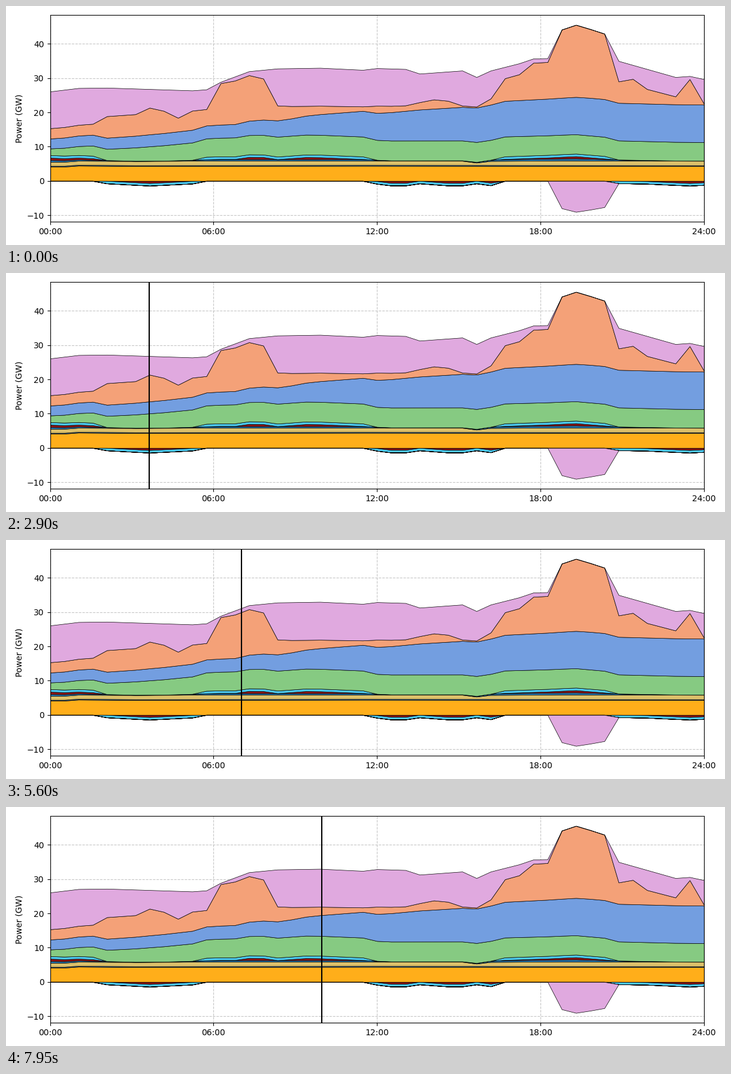
Animation of 1200 by 400 pixels, one loop 8 s. Source, as a matplotlib script:

```python
import numpy as np
import matplotlib.pyplot as plt
from matplotlib.animation import FuncAnimation

WIDTH, HEIGHT, DPI = 1200, 400, 100
FRAMES, INTERVAL = 160, 50
HOURS_PER_FRAME = 0.06278
STORE_LIMIT = 0.75

slots = np.arange(47)
hours = np.linspace(0, 24, slots.size)


def curve(points):
    """Piecewise linear curve through {slot: GW} points."""
    return np.interp(slots, list(points), list(points.values()))


# Layer thicknesses, bottom to top
amber = curve({1: 4.15, 2: 4.45, 6: 4.3, 22: 4.4, 46: 4.3})
steel = np.full(slots.size, 0.25)
khaki = curve({0: 1.15, 10: 1.3, 29: 1.25, 30: 0.7, 31: 1.2, 36: 1.35, 46: 1.3})
navy = curve({0: 0.5, 6: 0.05, 8: 0.05, 12: 0.45, 22: 0.4, 24: 0.05, 29: 0.1,
              32: 0.45, 37: 0.6, 40: 0.3, 44: 0.05})
green = curve({0: 1.95, 4: 3.3, 7: 4.2, 11: 5.35, 16: 5.8, 32: 5.8, 46: 5.4})
blue = curve({0: 2.9, 7: 3.5, 13: 3.9, 17: 5.05, 22: 7.5, 26: 9.05, 31: 10.3,
              38: 11, 46: 10.95})
salmon = curve({0: 3, 3: 3.2, 4: 6.3, 6: 6.3, 7: 7.8, 8: 6.5, 9: 4, 10: 5.6,
                11: 4.8, 12: 12.1, 14: 13.3, 15: 12, 16: 4.35, 18: 2.85,
                22: 1.3, 23: 2.1, 25: 1.6, 27: 2.7, 28: 2.05, 29: 0.4, 30: 0.3,
                31: 1.8, 32: 6.6, 33: 7.55, 34: 10.7, 35: 10.7, 36: 19.9,
                37: 21.05, 39: 19.1, 40: 6.25, 41: 7.1, 42: 4.25, 44: 2.3,
                45: 7.4, 46: 0.3})

# Storage runs on the cyan unit first; the red one takes the excess
storage = curve({0: 1.45, 3: 1.2, 4: -0.75, 7: -1.4, 10: -0.8, 11: 0.8, 13: 0.8,
                 14: 1.4, 15: 1.35, 16: 0.75, 18: 1.35, 19: 1.3, 22: 0.8,
                 23: -0.85, 24: -1.35, 25: -1.35, 26: -0.75, 28: -1.35,
                 29: -1.35, 30: -0.75, 31: -1.3, 32: 0.85, 35: 1.1, 37: 1.4,
                 39: 0.95, 40: -0.7, 42: -0.85, 45: -1.4, 46: -1.2})
cyan = np.clip(storage, -STORE_LIMIT, STORE_LIMIT)
red = storage - cyan

# Imports fill the gap up to demand; a surplus is exported
demand = curve({0: 26.1, 2: 27.1, 4: 27.2, 10: 26.4, 11: 26.7, 12: 28.9,
                14: 32, 16: 32.8, 19: 33, 22: 32.4, 23: 32.9, 25: 32.65,
                26: 31.3, 29: 32.2, 30: 30.3, 31: 32.2, 33: 34.3, 34: 35.7,
                35: 35.8, 37: 36.5, 39: 35.3, 40: 35, 44: 30.3, 45: 30.6,
                46: 29.7})
supply = (amber + steel + khaki + navy + green + blue + salmon
          + np.maximum(storage, 0))
plum = demand - supply

LAYERS = [(amber, "#ffae1a"), (steel, "#4f7f9f"), (khaki, "#dcc06a"),
          (navy, "#2a7fb8"), (red, "#8f1616"), (cyan, "#4cc9f0"),
          (green, "#86ca82"), (blue, "#739ee0"), (salmon, "#f4a178"),
          (plum, "#e0a9df")]


def draw_stack(ax, part):
    """Stack the positive or negative part of every layer."""
    base = np.zeros(slots.size)
    for thickness, color in LAYERS:
        edge = base + part(thickness, 0)
        ax.fill_between(hours, base, edge, facecolor=color,
                        edgecolor="black", linewidth=0.5)
        base = edge


fig, ax = plt.subplots(figsize=(WIDTH / DPI, HEIGHT / DPI), dpi=DPI)
fig.subplots_adjust(left=73.6 / WIDTH, right=1164.8 / WIDTH,
                    bottom=39 / HEIGHT, top=385 / HEIGHT)
ax.set_axisbelow(True)
ax.grid(True, linestyle="--", alpha=0.7)
draw_stack(ax, np.maximum)
draw_stack(ax, np.minimum)

ax.set_xlim(0, 24)
ax.set_ylim(-11.89, 48.44)
ax.set_xticks(range(0, 25, 6), [f"{h:02d}:00" for h in range(0, 25, 6)])
ax.set_yticks(range(-10, 41, 10))
ax.set_ylabel("Power (GW)")
cursor = ax.axvline(0, color="black", linewidth=1.5)


def update(frame):
    x = frame * HOURS_PER_FRAME
    cursor.set_xdata([x, x])
    return [cursor]


anim = FuncAnimation(fig, update, frames=FRAMES, interval=INTERVAL,
                     repeat=True, repeat_delay=0, cache_frame_data=False)
plt.show()
```
